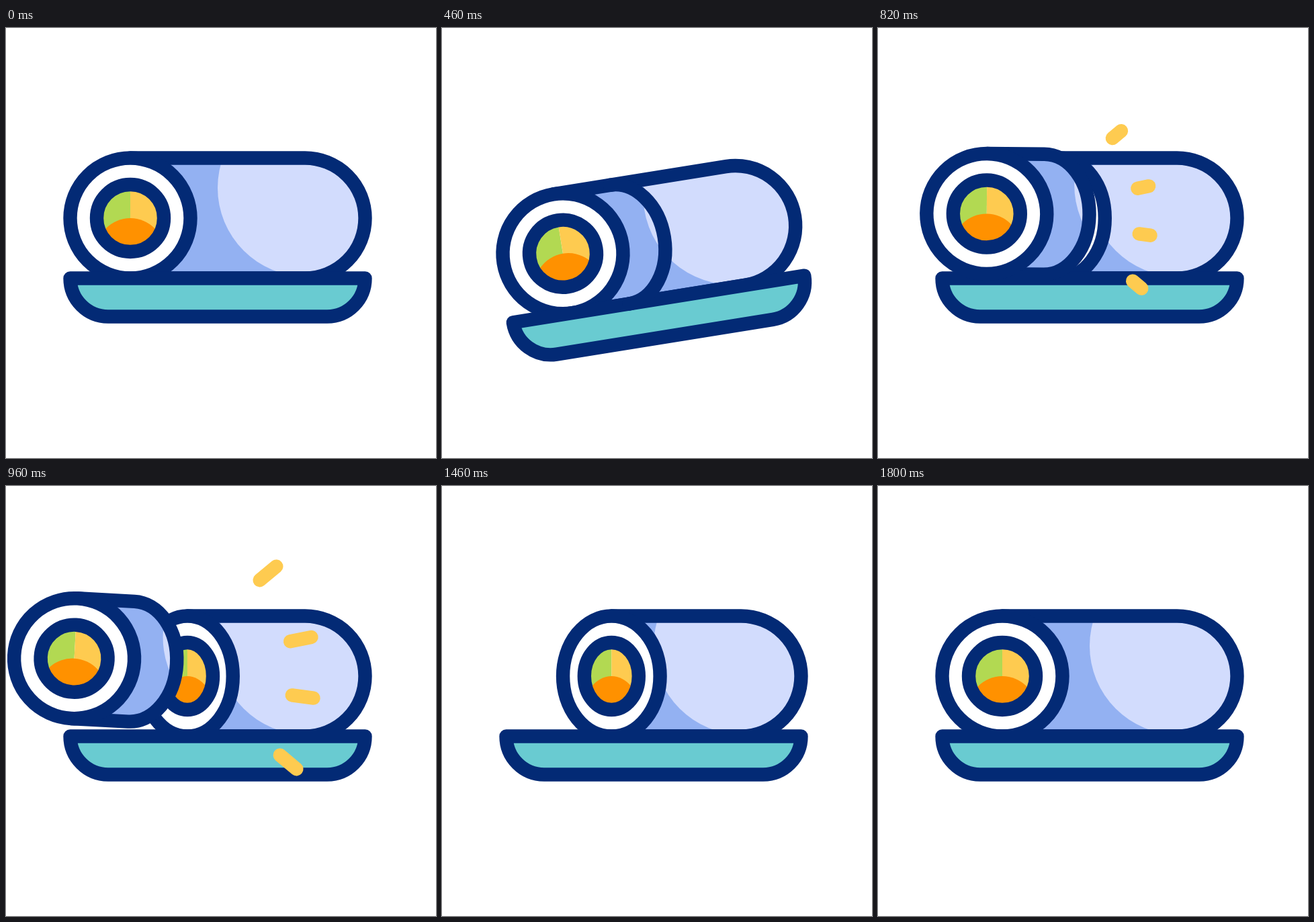
An HTML page with a canvas that plays this animation: 640 by 640 pixels, repeating every 3.6 s.

```html
<!DOCTYPE html>
<html lang="en">
<head>
<meta charset="utf-8">
<title>Sliced roll</title>
<style>
  html, body { margin: 0; width: 100%; height: 100%; overflow: hidden; background: #fff; }
  canvas { display: block; width: 100%; height: 100%; }
</style>
</head>
<body>
<canvas id="stage"></canvas>
<script>
const SIZE = 640, LOOP = 3600, LINE = 20.4;
const MID_Y = 283, RADIUS = 89.5, TOP = MID_Y - RADIUS, BOTTOM = MID_Y + RADIUS;
const CUT_X = 270, CUT_RX = 67.75, SPLIT = 665;
const NAVY = '#032a75', BLUE = '#93b1f2', PALE = '#d2dcfd', TEAL = '#69cbd1',
      GREEN = '#b2d952', YELLOW = '#fecb50', ORANGE = '#ff9100';

// Outer end and direction in degrees of each burst ray.
const RAYS = [[405.8, 116.8, -39.7], [458.9, 224, -11.5], [462, 316.2, 7.6], [435.8, 424.2, 40]];
const RAY_LENGTH = 74;

const canvas = document.getElementById('stage');
const ctx = canvas.getContext('2d');
const density = window.devicePixelRatio || 1;
canvas.width = canvas.height = SIZE * density;

const rad = degrees => degrees * Math.PI / 180;

function ease(t, from, to) {
  const x = Math.min(1, Math.max(0, (t - from) / (to - from)));
  return x * x * (3 - 2 * x);
}

function scoped(draw) {
  ctx.save();
  draw();
  ctx.restore();
}

function rotateAbout(x, y, degrees) {
  ctx.translate(x, y);
  ctx.rotate(rad(degrees));
  ctx.translate(-x, -y);
}

function fillEllipse(x, y, rx, ry, color) {
  ctx.beginPath();
  ctx.ellipse(x, y, rx, ry, 0, 0, 2 * Math.PI);
  ctx.fillStyle = color;
  ctx.fill();
}

function strokeLine(color = NAVY) {
  ctx.strokeStyle = color;
  ctx.lineWidth = LINE;
  ctx.stroke();
}

function drawTube(frontX, backX, backRx) {
  const tube = () => {
    ctx.beginPath();
    ctx.moveTo(frontX, TOP);
    ctx.lineTo(backX, TOP);
    ctx.ellipse(backX, MID_Y, backRx, RADIUS, 0, -Math.PI / 2, Math.PI / 2);
    ctx.lineTo(frontX, BOTTOM);
  };
  scoped(() => {
    tube();
    ctx.fillStyle = BLUE;
    ctx.fill();
    ctx.clip();
    fillEllipse(447, 238, 132, 132, PALE);
  });
  tube();
  strokeLine();
}

function drawFilling(x, squeeze) {
  scoped(() => {
    ctx.translate(x, MID_Y);
    ctx.scale(squeeze, 1);
    ctx.beginPath();
    ctx.arc(0, 0, 46, 0, 2 * Math.PI);
    ctx.clip();
    ctx.fillStyle = GREEN;
    ctx.fillRect(-50, -50, 50, 100);
    ctx.fillStyle = YELLOW;
    ctx.fillRect(0, -50, 50, 100);
    fillEllipse(0, 51, 51, 51, ORANGE);
  });
}

// extent 0 ends the roll at the cut, 1 gives it full length.
function drawRoll(extent, backX = 445, backRx = RADIUS) {
  const x = CUT_X - 85 * extent;
  const rx = CUT_RX + (RADIUS - CUT_RX) * extent;
  const ringRx = 38 + 12 * extent;
  drawTube(x, backX, backRx);
  fillEllipse(x, MID_Y, rx, RADIUS, '#fff');
  strokeLine();
  drawFilling(x, ringRx / 50);
  ctx.beginPath();
  ctx.ellipse(x, MID_Y, ringRx, 50, 0, 0, 2 * Math.PI);
  strokeLine();
}

function drawPlate() {
  ctx.beginPath();
  ctx.moveTo(95.5, 372.5);
  ctx.lineTo(534.5, 372.5);
  ctx.ellipse(478, 372.5, 56.5, 57, 0, 0, Math.PI / 2);
  ctx.lineTo(152, 429.5);
  ctx.ellipse(152, 372.5, 56.5, 57, 0, Math.PI / 2, Math.PI);
  ctx.closePath();
  ctx.fillStyle = TEAL;
  ctx.fill();
  strokeLine();
}

function drawCut(t) {
  const start = -Math.PI / 2;
  ctx.beginPath();
  ctx.ellipse(CUT_X, MID_Y, CUT_RX, RADIUS, 0, start, start + Math.PI * ease(t, 0, 400));
  strokeLine();
}

function drawSlice(t) {
  const k = (t - SPLIT) / 475;
  scoped(() => {
    ctx.translate(-215 * k ** 2, -65.9 * k ** 2.13);
    rotateAbout(227.5, MID_Y, 12 * k ** 2.9);
    drawRoll(1, CUT_X, CUT_RX);
  });
}

function drawRays(t) {
  const head = RAY_LENGTH * (1 - ease(t, 740, 1000));
  const tail = RAY_LENGTH * (1 - ease(t, 820, 1100));
  for (const [x, y, angle] of RAYS) {
    const dx = Math.cos(rad(angle)), dy = Math.sin(rad(angle));
    ctx.beginPath();
    ctx.moveTo(x - dx * tail, y - dy * tail);
    ctx.lineTo(x - dx * head, y - dy * head);
    strokeLine(YELLOW);
  }
}

function drawScene(t) {
  ctx.setTransform(density, 0, 0, density, 0, 0);
  ctx.fillStyle = '#fff';
  ctx.fillRect(0, 0, SIZE, SIZE);
  ctx.lineCap = ctx.lineJoin = 'round';

  const tilt = -11.8 * (ease(t, 20, 363) - ease(t, 363, 681));
  const sink = 31.7 * (ease(t, 80, 449) - ease(t, 449, 752));
  scoped(() => {
    ctx.translate(0, sink);
    rotateAbout(315, 325, tilt);
    drawRoll(t < SPLIT ? 1 : ease(t, 1320, 1800));
    drawPlate();
    if (t < SPLIT) drawCut(t);
    else if (t < 1400) drawSlice(t);
  });
  if (t > 740 && t < 1100) drawRays(t);
}

const begin = performance.now();
function tick() {
  drawScene((performance.now() - begin) % LOOP);
  requestAnimationFrame(tick);
}
tick();
</script>
</body>
</html>
```
